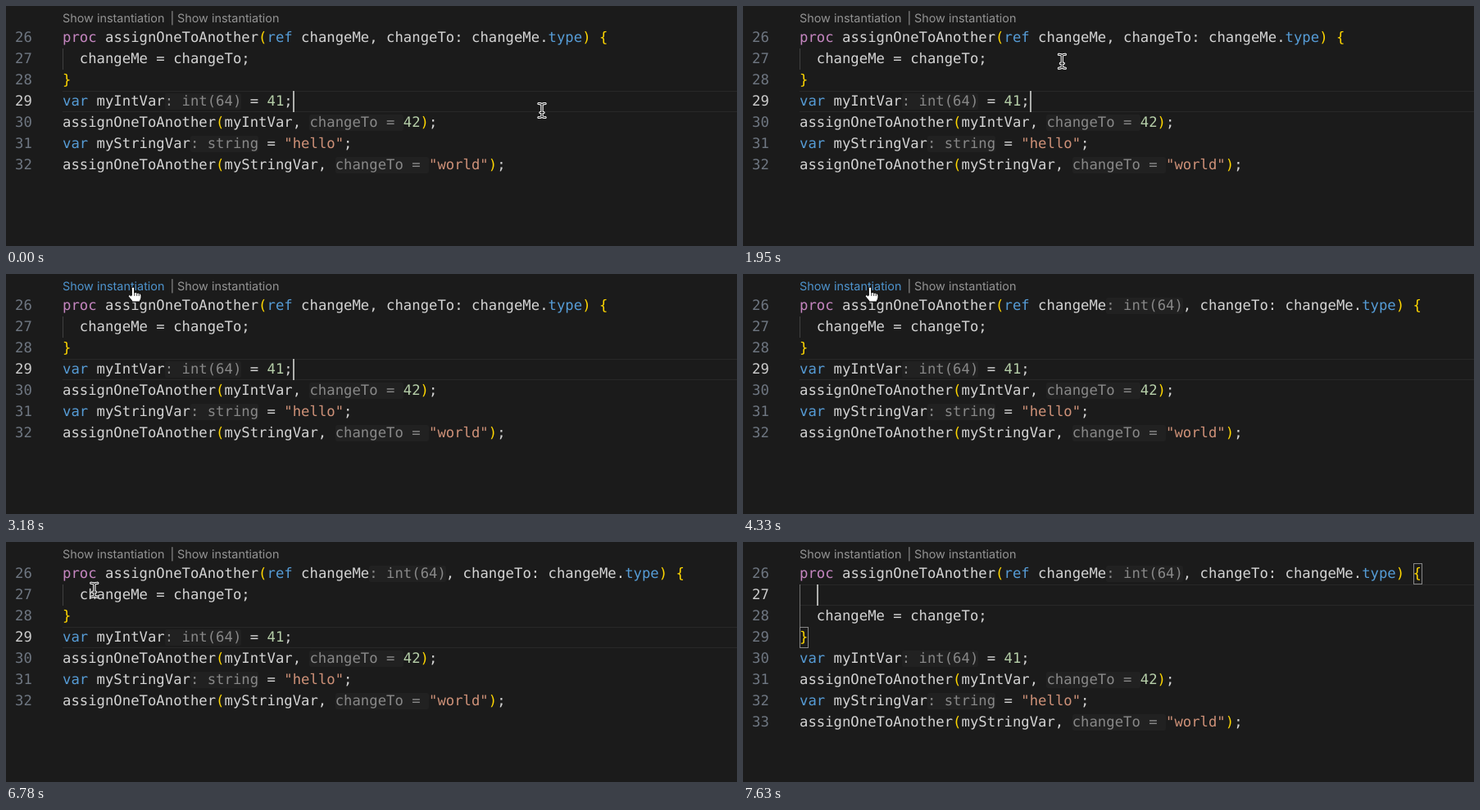
An HTML page that plays this animation: 892 px wide and 294 px high, repeating every 8 s.

```html
<!DOCTYPE html>
<html lang="en">
<head>
<meta charset="utf-8">
<title>Editor: show instantiation</title>
<style>
html, body { margin: 0; width: 100%; height: 100%; overflow: hidden; background: #1b1b1b; }
#stage {
  position: relative; width: 892px; height: 294px; overflow: hidden;
  background: #1b1b1b; color: #d4d4d4;
  font: 17.275px/26px "DejaVu Sans Mono", monospace;
  text-rendering: geometricPrecision;
}
#stage div, #stage svg { position: absolute; }
.row, .num, .lens { white-space: pre; height: 26px; }
.row { left: 69px; }
.num { left: 0; width: 31.8px; text-align: right; color: #6e7681; }
.num.on { color: #cccccc; }
.lens { top: 2.8px; font: 14.4px/26px Inter, sans-serif; color: #949494; }
.lens.hover { color: #4e94ce; }
.kw { color: #569cd6; }
.proc { color: #c586c0; }
.br { color: #ffd700; }
.lit { color: #b5cea8; }
.str { color: #ce9178; }
.hint { display: inline-block; line-height: 20px; border-radius: 3px; color: #888888; background: #8888880f; }
#line { left: 69px; right: 0; height: 24px; border: solid #282828; border-width: 1px 0; }
#guide { left: 69px; width: 1px; top: 52px; }
#caret { width: 2px; height: 26px; background: #aeafad; }
.word { height: 26px; background: #3e3e3e; }
.match { box-sizing: border-box; width: 11px; height: 26px; border: 1px solid #888888; }
#mouse { left: 0; top: 0; overflow: visible; }
</style>
</head>
<body>
<div id="stage"></div>
<script>
const LOOP = 8000, LEFT = 69, CHAR = 10.4, ROW = 26;
const HINT_ON = 3800, CLICK = 6880, MOUSE_OFF = 6930, WORDS_ON = 7130, ENTER = 7200, UP = 7530;

const stage = document.getElementById('stage');
const colX = col => LEFT + col * CHAR;
const rowY = row => ROW * (row + 1);

function add(className, html = '', style = {}) {
  const el = document.createElement('div');
  el.className = className;
  el.innerHTML = html;
  Object.assign(el.style, style);
  return stage.appendChild(el);
}
function addId(id) {
  const el = add('');
  el.id = id;
  return el;
}
const show = (el, on) => { el.style.visibility = on ? 'visible' : 'hidden'; };
const moveTo = (el, row) => { el.style.top = rowY(row) + 'px'; };
const tag = (name, text) => `<span class="${name}">${text}</span>`;
const call = args => 'assignOneToAnother' + tag('br', '(') + args + tag('br', ')');

const line = addId('line');
const words = [[0, 24, 22], [0, 57, 8], [1, 2, 8]].map(([row, col, len]) =>
  add('word', '', { left: colX(col) + 'px', top: rowY(row) + 'px', width: len * CHAR + 'px' }));
const guide = addId('guide');

const links = [69, 209].map(x => add('lens', 'Show instantiation', { left: x + 'px' }));
add('lens', '|', { left: '200.5px' });

const rows = [
  tag('proc', 'proc') + ' ' + call(tag('kw', 'ref') + ' changeMe' + tag('hint', ': int(64)') +
    ', changeTo: changeMe.' + tag('kw', 'type')) + ' ' + tag('br', '{'),
  '  changeMe = changeTo;',
  tag('br', '}'),
  tag('kw', 'var') + ' myIntVar' + tag('hint', ': int(64)') + ' = ' + tag('lit', '41') + ';',
  call('myIntVar, ' + tag('hint', 'changeTo = ') + tag('lit', '42')) + ';',
  tag('kw', 'var') + ' myStringVar' + tag('hint', ': string') + ' = ' + tag('str', '"hello"') + ';',
  call('myStringVar, ' + tag('hint', 'changeTo = ') + tag('str', '"world"')) + ';'
].map(html => add('row', html));
const typeHint = rows[0].querySelector('.hint');

const nums = Array.from({ length: 8 }, (_, i) => add('num', 26 + i, { top: rowY(i) + 'px' }));
const openMatch = add('match', '', { left: '818px', top: rowY(0) + 'px' });
const closeMatch = add('match', '', { left: '69px' });
const caret = addId('caret');

stage.insertAdjacentHTML('beforeend', `
<svg id="mouse" width="1" height="1" fill="none" stroke-linecap="round" stroke-linejoin="round">
  <g id="beam">
    <path id="bar" d="M-4-8.5q3 0 4 1.5q1-1.5 4-1.5M0-7V7M-4 8.5q3 0 4-1.5q1 1.5 4 1.5M-2 2.5H2" stroke="#f0f0f0" stroke-width="3"/>
    <use href="#bar"/>
    <path d="M-4-8.5q3 0 4 1.5q1-1.5 4-1.5M0-7V7M-4 8.5q3 0 4-1.5q1 1.5 4 1.5M-2 2.5H2" stroke="#111" stroke-width="1.1"/>
  </g>
  <g id="hand" stroke="#000">
    <path fill="#fff" stroke-width="1" d="M-1.7 9V.6a1.7 1.7 0 0 1 3.4 0V6q1.6-1.3 3 .3q1.6-.9 2.7 .5q2.6-.6 2.6 2.2v2.5q0 2-1.5 4v1.5h-9.5q-1-2.6-3-4.4q-2.5-2.6-1.6-3.6q1.3-1 2.9 .5z"/>
    <path stroke-width=".8" d="M1.8 6.5v3M4.7 6.8v2.7M7.3 7.2v2.4"/>
  </g>
</svg>`);
const [mouse, beam, hand] = ['mouse', 'beam', 'hand'].map(id => document.getElementById(id));

// time, x, y of the pointer's hot spot
const track = [
  [150, 654, 128], [300, 645, 129], [570, 645, 129], [800, 467, 98],
  [1230, 467, 98], [1420, 475, 87], [1790, 475, 87], [2100, 310, 50],
  [2300, 190, 25], [2380, 176, 23], [2580, 155, 17], [6220, 155, 17],
  [6350, 165, 24], [6600, 140, 46], [6870, 92, 65]
];

function pointerAt(t) {
  const i = track.findIndex(p => p[0] > t);
  if (i === 0) return track[0].slice(1);
  if (i < 0) return track[track.length - 1].slice(1);
  const [t0, x0, y0] = track[i - 1], [t1, x1, y1] = track[i];
  const k = (t - t0) / (t1 - t0);
  return [x0 + (x1 - x0) * k, y0 + (y1 - y0) * k];
}

function render(t) {
  const clicked = t >= CLICK, entered = t >= ENTER;
  const active = !clicked ? 3 : entered && t < UP ? 2 : 1;

  rows.forEach((el, i) => moveTo(el, i + (entered && i > 0 ? 1 : 0)));
  nums.forEach((el, i) => el.classList.toggle('on', i === active));
  show(nums[7], entered);
  typeHint.style.display = t >= HINT_ON ? '' : 'none';

  moveTo(line, active);
  guide.style.height = (entered ? 2 : 1) * ROW + 'px';
  guide.style.background = clicked ? '#707070' : '#404040';
  words.forEach(el => show(el, t >= WORDS_ON && !entered));
  show(openMatch, clicked);
  show(closeMatch, clicked);
  moveTo(closeMatch, entered ? 3 : 2);

  moveTo(caret, active);
  caret.style.left = Math.round(colX(clicked ? 2 : 27)) + 'px';
  show(caret, clicked || (t + 670) % 1000 >= 500);

  const [x, y] = pointerAt(t);
  const hover = y <= 25 && x >= 69 && x <= 196;
  links[0].classList.toggle('hover', hover);
  mouse.style.transform = `translate(${x}px, ${y}px)`;
  mouse.style.display = t < MOUSE_OFF ? '' : 'none';
  beam.style.display = hover ? 'none' : '';
  hand.style.display = hover ? '' : 'none';
}

function tick() {
  render(performance.now() % LOOP);
  requestAnimationFrame(tick);
}
tick();
</script>
</body>
</html>
```
